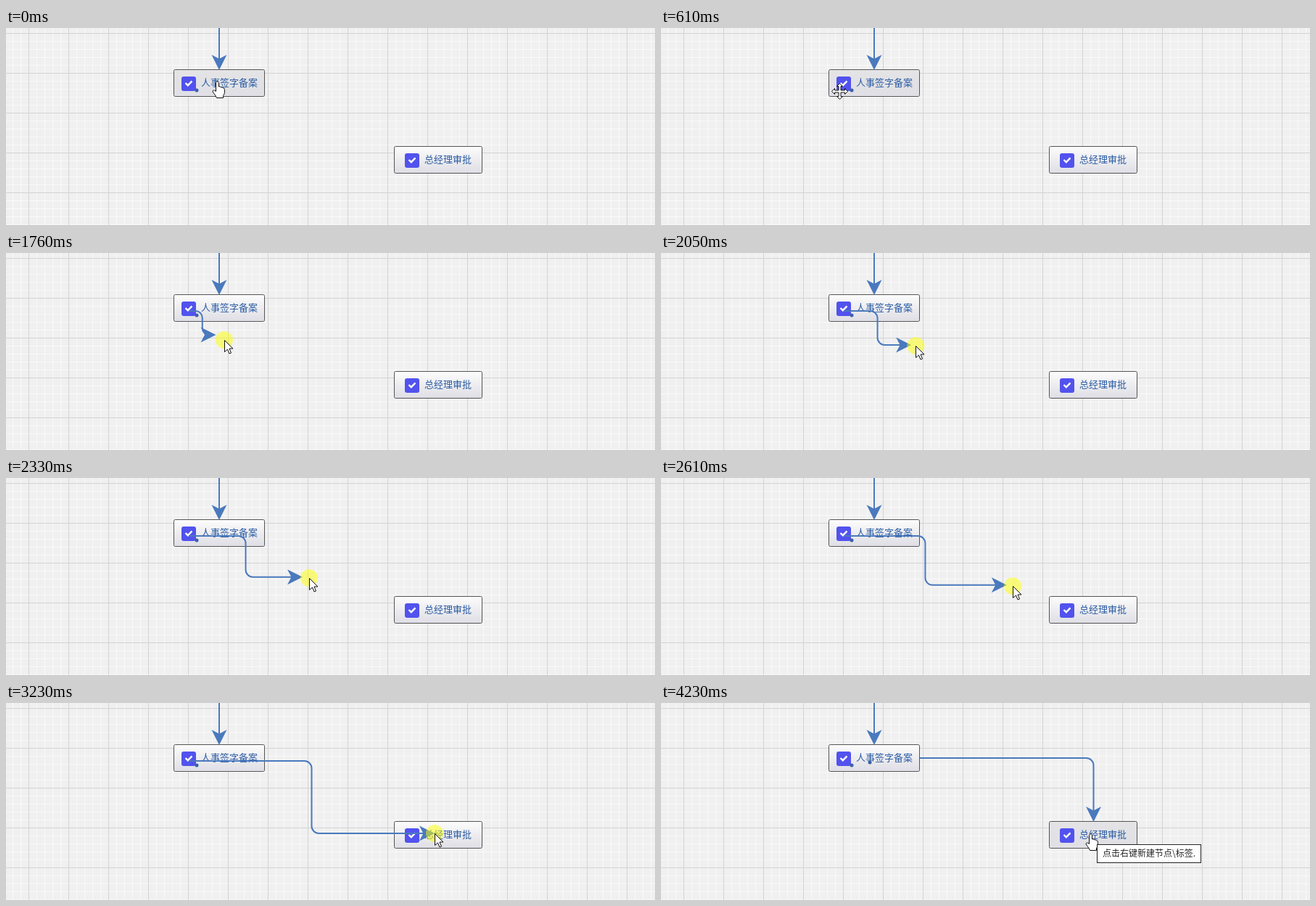
An HTML page with a canvas for the animation above (4960 ms loop, 895 by 272 pixels).

```html
<!DOCTYPE html>
<html lang="zh-CN">
<head>
<meta charset="utf-8">
<title>流程连线</title>
<style>
  html, body { margin: 0; width: 100%; height: 100%; overflow: hidden; background: #f0f0f0; }
  canvas { display: block; }
</style>
</head>
<body>
<canvas id="stage" width="895" height="272"></canvas>
<script>
const ctx = document.getElementById('stage').getContext('2d');
const LOOP = 4960, PRESS = 1160, DRAG = 1620, RELEASE = 3700, TOOLTIP = 4230, STEP = 70;
const BLUE = '#4a79bd';
const FONT = '"Noto Sans CJK SC", "Noto Sans CJK", "Noto Sans", sans-serif';
const PORT = [252, 80];

// Pointer paths: time, x, y
const approach = [
  [260, 291, 73], [330, 287, 76], [400, 279, 82], [470, 268, 86],
  [540, 255, 88], [610, 246, 87], [750, 248, 83], [820, 250, 81], [890, 251, 81]
];
const drag = [
  [1550, 251, 79], [1620, 258, 87], [1690, 278, 106], [1760, 301, 120], [2110, 364, 130],
  [2320, 418, 138], [2670, 502, 152], [2880, 560, 169], [2950, 574, 174],
  [3090, 588, 179], [3160, 591, 180]
];

const MOVE = [[0, -11], [4, -7], [1.5, -7], [1.5, -1.5], [7, -1.5], [7, -4]];
const ARROW = [[0, 0], [0, 16], [4, 12.5], [6.5, 18.5], [9, 17.5], [6.5, 11.5], [11.5, 11.5]];

function along(path, t) {
  if (t <= path[0][0]) return path[0].slice(1);
  for (let i = 1; i < path.length; i++) {
    const [t0, x0, y0] = path[i - 1], [t1, x1, y1] = path[i];
    if (t <= t1) {
      const k = (t - t0) / (t1 - t0);
      return [x0 + (x1 - x0) * k, y0 + (y1 - y0) * k];
    }
  }
  return path[path.length - 1].slice(1);
}

const snap = (t, start) => start + Math.floor((t - start) / STEP) * STEP;

function polygon(points) {
  ctx.beginPath();
  points.forEach(([x, y]) => ctx.lineTo(x, y));
  ctx.closePath();
}

function disc(x, y, r, color) {
  ctx.fillStyle = color;
  ctx.beginPath();
  ctx.arc(x, y, r, 0, Math.PI * 2);
  ctx.fill();
}

function label(text, x, y, size, color) {
  ctx.font = `${size}px ${FONT}`;
  ctx.fillStyle = color;
  ctx.fillText(text, x, y);
}

function gridLines(step, color) {
  ctx.fillStyle = color;
  for (let x = 31 % step; x < 895; x += step) ctx.fillRect(x, 0, 1, 272);
  for (let y = 7 % step; y < 272; y += step) ctx.fillRect(0, y, 895, 1);
}

function node(x, y, w, iconX, text, hover) {
  const fill = ctx.createLinearGradient(0, y, 0, y + 38);
  fill.addColorStop(0, hover ? '#e4e4e6' : '#fdfdfd');
  fill.addColorStop(1, hover ? '#dfdfe5' : '#dddde4');
  ctx.fillStyle = fill;
  ctx.strokeStyle = '#555';
  ctx.lineWidth = 1;
  ctx.beginPath();
  ctx.roundRect(x + 0.5, y + 0.5, w - 1, 37, 2);
  ctx.fill();
  ctx.stroke();

  ctx.fillStyle = '#5252ee';
  ctx.beginPath();
  ctx.roundRect(iconX, y + 10, 20, 20, 3);
  ctx.fill();
  ctx.strokeStyle = '#fff';
  ctx.lineWidth = 2.4;
  ctx.beginPath();
  ctx.moveTo(iconX + 5.5, y + 19);
  ctx.lineTo(iconX + 8.8, y + 22.2);
  ctx.lineTo(iconX + 14.5, y + 16.3);
  ctx.stroke();
  label(text, iconX + 27, y + 23, 13, '#2b5ca3');
}

function arrowhead(x, y, angle) {
  ctx.save();
  ctx.translate(x, y);
  ctx.rotate(angle);
  ctx.fillStyle = BLUE;
  polygon([[0, 0], [-21, -10.5], [-15.5, 0], [-21, 10.5]]);
  ctx.fill();
  ctx.restore();
}

function link(points, angle) {
  const end = points[points.length - 1];
  ctx.strokeStyle = BLUE;
  ctx.lineWidth = 2;
  ctx.beginPath();
  ctx.moveTo(...points[0]);
  for (let i = 1; i < points.length - 1; i++) {
    const [p, c, n] = points.slice(i - 1, i + 2);
    const reach = q => Math.hypot(q[0] - c[0], q[1] - c[1]) / 2;
    ctx.arcTo(...c, ...n, Math.min(10, reach(p), reach(n)));
  }
  ctx.lineTo(end[0] - 10 * Math.cos(angle), end[1] - 10 * Math.sin(angle));
  ctx.stroke();
  arrowhead(...end, angle);
}

function handShape() {
  ctx.beginPath();
  ctx.moveTo(-2, 14);
  ctx.lineTo(-2, 2);
  ctx.quadraticCurveTo(0, -1.5, 2, 2);
  ctx.lineTo(2, 7.5);
  ctx.quadraticCurveTo(4, 6.5, 5, 8.5);
  ctx.quadraticCurveTo(7, 7.5, 8, 9.5);
  ctx.quadraticCurveTo(10, 9, 10, 12);
  ctx.lineTo(10, 16);
  ctx.quadraticCurveTo(9, 19, 8, 20);
  ctx.lineTo(8, 23);
  ctx.lineTo(-1, 23);
  ctx.quadraticCurveTo(-2, 20, -6.5, 14.5);
  ctx.quadraticCurveTo(-6, 10.5, -2, 14);
  ctx.closePath();
}

function pointer(kind, [x, y], pressed) {
  ctx.save();
  ctx.translate(Math.round(x) + 0.5, Math.round(y) + 0.5);
  if (kind === 'hand') handShape();
  else if (kind === 'arrow') polygon(ARROW);
  else {
    const turn = ([px, py]) => [-py, px];
    const sides = [MOVE];
    while (sides.length < 4) sides.push(sides[sides.length - 1].map(turn));
    polygon(sides.flat());
  }
  ctx.fillStyle = kind === 'move' && pressed ? '#f7f58c' : '#fff';
  ctx.strokeStyle = kind === 'move' && pressed ? '#55551c' : '#111';
  ctx.lineWidth = 1;
  ctx.fill();
  ctx.stroke();
  ctx.restore();
}

function draw(t) {
  const pressed = t >= PRESS && t < RELEASE;
  const linked = t >= RELEASE;
  const time = t < DRAG ? snap(t, 330) : snap(t, DRAG);
  const at = along(t < PRESS ? approach : drag, t < PRESS || t >= DRAG ? time : 0);

  ctx.fillStyle = '#f0f0f0';
  ctx.fillRect(0, 0, 895, 272);
  gridLines(11, '#f9f9f9');
  gridLines(55, '#d3d3d3');

  node(231, 57, 126, 242, '人事签字备案', t < PRESS);
  node(535, 163, 122, 550, '总经理审批', linked);
  disc(263, 86, 2.5, '#3b62a8');
  link([[294, -10], [294, 58]], Math.PI / 2);

  if (linked) {
    disc(288, 82, 2.5, '#3b62a8');
    link([[357, 76], [596.5, 76], [596.5, 164]], Math.PI / 2);
  } else if (t >= DRAG) {
    // The loose end trails the pointer by half a step
    const [x, y] = along(drag, time - STEP / 2);
    const mid = (PORT[0] + x) / 2;
    link([PORT, [mid, PORT[1]], [mid, y], [x, y]], 0);
  }

  if (pressed) disc(...at, 12, 'rgba(255, 255, 0, 0.5)');

  let kind = 'hand';
  if (pressed) kind = time >= 2880 && time < 2950 + STEP ? 'move' : 'arrow';
  else if (time >= 540 && time < 750) kind = 'move';
  pointer(kind, linked ? [592, 180] : at, pressed);

  if (t >= TOOLTIP) {
    ctx.fillStyle = '#fff';
    ctx.strokeStyle = '#222';
    ctx.lineWidth = 1;
    ctx.fillRect(601, 195, 144, 26);
    ctx.strokeRect(601.5, 195.5, 143, 25);
    label('点击右键新建节点\\标签.', 609, 212, 12, '#222');
  }
}

const start = performance.now();
function tick() {
  draw((performance.now() - start) % LOOP);
  requestAnimationFrame(tick);
}
tick();
</script>
</body>
</html>
```
